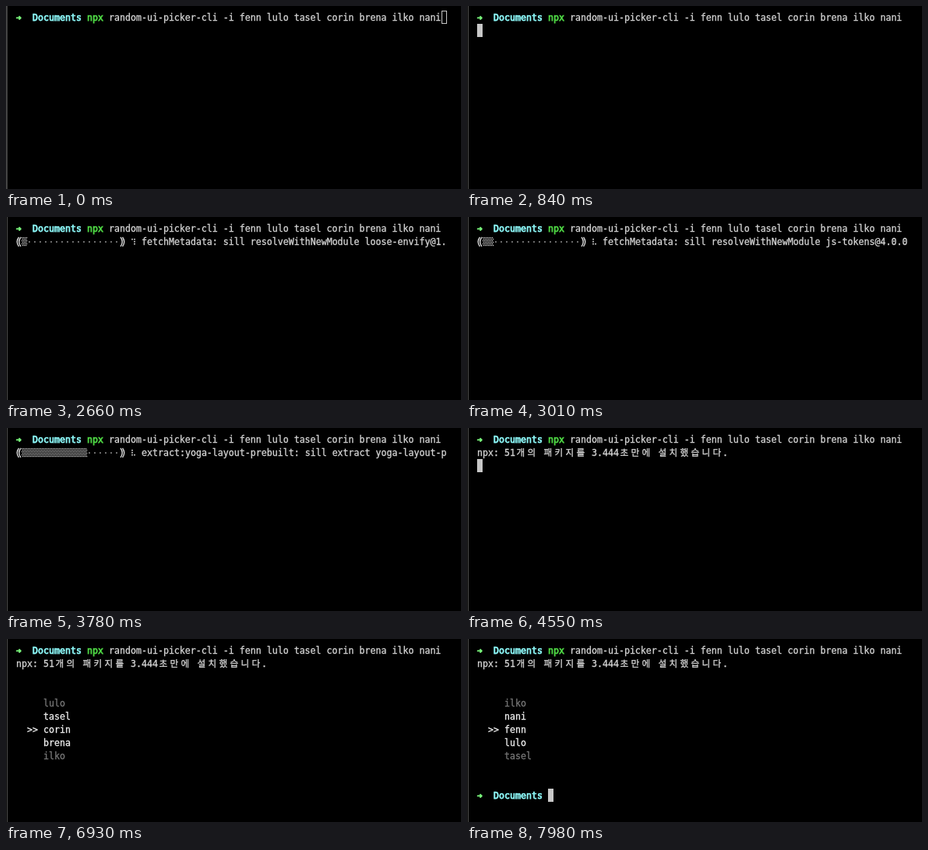
Animation, 584 px wide and 236 px high, one loop 8400 ms. Source, as an HTML page:

```html
<!DOCTYPE html>
<html lang="ko">
<head>
<meta charset="utf-8">
<title>random-ui-picker-cli</title>
<style>
  html, body { margin: 0; width: 100%; height: 100%; overflow: hidden; background: #000; }
  svg { display: block; width: 584px; height: 236px; }
  text {
    font: 11.627px "DejaVu Sans Mono", "Noto Sans CJK KR", "Noto Sans CJK", monospace;
    white-space: pre;
    font-variant-ligatures: none;
    stroke-width: .3px;
  }
  .bold { stroke-width: .75px; }
</style>
</head>
<body>
<svg id="term" viewBox="0 0 584 236"></svg>
<script>
const LOOP = 8400, TICK = 70;
const CELL = 7, LINE = 17, LEFT = 13, TOP = 6, COLS = 79;
const FG = '#d6d6d6', WHITE = '#f0f0f0', DIM = '#777', CURSOR = '#c7c7c7';
const GREEN = '#4fd845', LIME = '#7dfc7f', CYAN = '#8ffdfd';

const people = ['fenn', 'lulo', 'tasel', 'corin', 'brena', 'ilko', 'nani'];
const args = 'random-ui-picker-cli -i ' + people.join(' ');
const spinner = '⠋⠙⠹⠸⠼⠴⠦⠧⠇⠏';
const rolls = [4970, 5110, 5250, 5460, 5600, 5740, 5950, 6090, 6230, 6440,
  6580, 6720, 6930, 7070, 7210, 7350, 7560];
const firstPick = 5;

const resolve = pkg => `fetchMetadata: sill resolveWithNewModule ${pkg} checking installable status`;
const extract = pkg => `extract:${pkg}: sill extract ${pkg}`;

// Bursts of installer output: start, ticks, spinner offset, [from tick, fill, label]
const bursts = [
  { at: 1750, ticks: 12, spin: 2, rows: [
    [0, 1, resolve('ink@3.0.8')],
    [2, 1, resolve('meow@9.0.0')],
    [4, 1, resolve('react@17.0.2')],
    [7, 1, resolve('chalk@4.1.0')],
    [9, 1, resolve('object-assign@4.1.1')]] },
  { at: 2660, ticks: 12, spin: 2, rows: [
    [0, 1, resolve('loose-envify@1.4.0')],
    [3, 2, resolve('js-tokens@4.0.0')],
    [8, 2, resolve('color-name@1.1.4')],
    [10, 7, extract('react-reconciler')]] },
  { at: 3780, ticks: 3, spin: 7, rows: [
    [0, 12, extract('yoga-layout-prebuilt')]] },
  { at: 4200, ticks: 4, spin: 0, rows: [
    [0, 14, extract('yoga-layout-prebuilt')],
    [2, 16, extract('lodash')],
    [3, 18, extract('lodash')]] }
];

const px = col => LEFT + col * CELL;
const py = row => TOP + row * LINE;
const esc = s => s.replace(/&/g, '&amp;').replace(/</g, '&lt;').replace(/>/g, '&gt;');

const text = (x, row, str, color, cls = '') =>
  `<text x="${x}" y="${py(row) + 13}" class="${cls}" fill="${color}" stroke="${color}">${esc(str)}</text>`;

const label = (col, row, str, color = FG, cls) => text(px(col), row, str, color, cls);

// Hangul takes two cells per character
function wideLabel(row, str) {
  let col = 0;
  const xs = [...str].map(ch => {
    const wide = ch >= '가' && ch <= '힣';
    const x = px(col) + (wide ? 1.5 : 0);
    col += wide ? 2 : 1;
    return x;
  });
  return text(xs.join(' '), row, str, FG);
}

const block = (col, row) =>
  `<rect x="${px(col)}" y="${py(row)}" width="${CELL}" height="${LINE}" fill="${CURSOR}"/>`;

const hollow = (col, row) =>
  `<rect x="${px(col) + .5}" y="${py(row) + .5}" width="${CELL - 1}" height="${LINE - 1}" fill="none" stroke="${CURSOR}"/>`;

const dot = (x, y, r) => `<circle cx="${x}" cy="${y}" r="${r}" fill="${FG}"/>`;

const prompt = row =>
  label(0, row, '➜', LIME, 'bold') + label(3, row, 'Documents', CYAN, 'bold');

function bracket(col, dir) {
  const mid = px(col) + 3.5;
  const arc = x => `M${x} 26q${-4.5 * dir} 6 0 12`;
  return `<path d="${arc(mid)}${arc(mid + 2.5 * dir)}" fill="none" stroke="${FG}" stroke-width="1.4"/>`;
}

function braille(col, ch) {
  const bits = ch.codePointAt(0) & 63;
  let out = '';
  for (let i = 0; i < 6; i++) {
    if (bits >> i & 1) out += dot(px(col) + (i < 3 ? 2 : 5), 28.8 + (i % 3) * 3, .95);
  }
  return out;
}

function gauge(fill, spin, msg) {
  let out = bracket(0, 1) + bracket(19, -1);
  let shade = '';
  for (let y = 0; y < 6; y++) {
    for (let x = y % 2; x < fill * CELL; x += 2) {
      shade += `M${px(1) + x} ${26 + y * 2}h1.2v1.2h-1.2z`;
    }
  }
  out += `<path d="${shade}" fill="${FG}"/>`;
  for (let i = fill; i < 18; i++) out += dot(px(i + 1) + 3, 32, .85);
  return out + braille(21, spinner[spin % 10]) + label(23, 1, msg.slice(0, COLS - 23));
}

function install(t) {
  const burst = bursts.filter(b => t >= b.at).pop();
  const tick = Math.min(Math.floor((t - burst.at) / TICK), burst.ticks - 1);
  const [, fill, msg] = burst.rows.filter(r => tick >= r[0]).pop();
  return gauge(fill, tick + burst.spin, msg);
}

function picker(t) {
  const pick = firstPick + rolls.filter(at => t >= at).length - 1;
  let out = label(2, 6, '>>', WHITE);
  for (let i = -2; i <= 2; i++) {
    const name = people[(pick + i) % people.length];
    out += label(5, 6 + i, name, Math.abs(i) < 2 ? WHITE : DIM);
  }
  return out;
}

function scene(t) {
  const edge = t < 490
    ? '<rect width="2" height="236" fill="#444"/>'
    : '<rect x="1" width="1" height="236" fill="#555"/>';
  let out = edge + prompt(0) + label(13, 0, 'npx', GREEN, 'bold') + label(17, 0, args);
  if (t < 490) return out + hollow(78, 0);
  if (t < 840) return out + block(78, 0);
  if (t < 1750) return out + block(0, 1);
  if (t < 4480) return out + install(t);
  if (t < 4550) return out + block(0, 1);
  out += wideLabel(1, 'npx: 51개의 패키지를 3.444초만에 설치했습니다.');
  if (t < 4970) return out + block(0, 2);
  out += picker(t);
  if (t >= 7980) out += prompt(11) + block(13, 11);
  return out;
}

const term = document.getElementById('term');
let shown = '';

function draw() {
  const next = scene(performance.now() % LOOP);
  if (next !== shown) term.innerHTML = shown = next;
  requestAnimationFrame(draw);
}
draw();
</script>
</body>
</html>
```
